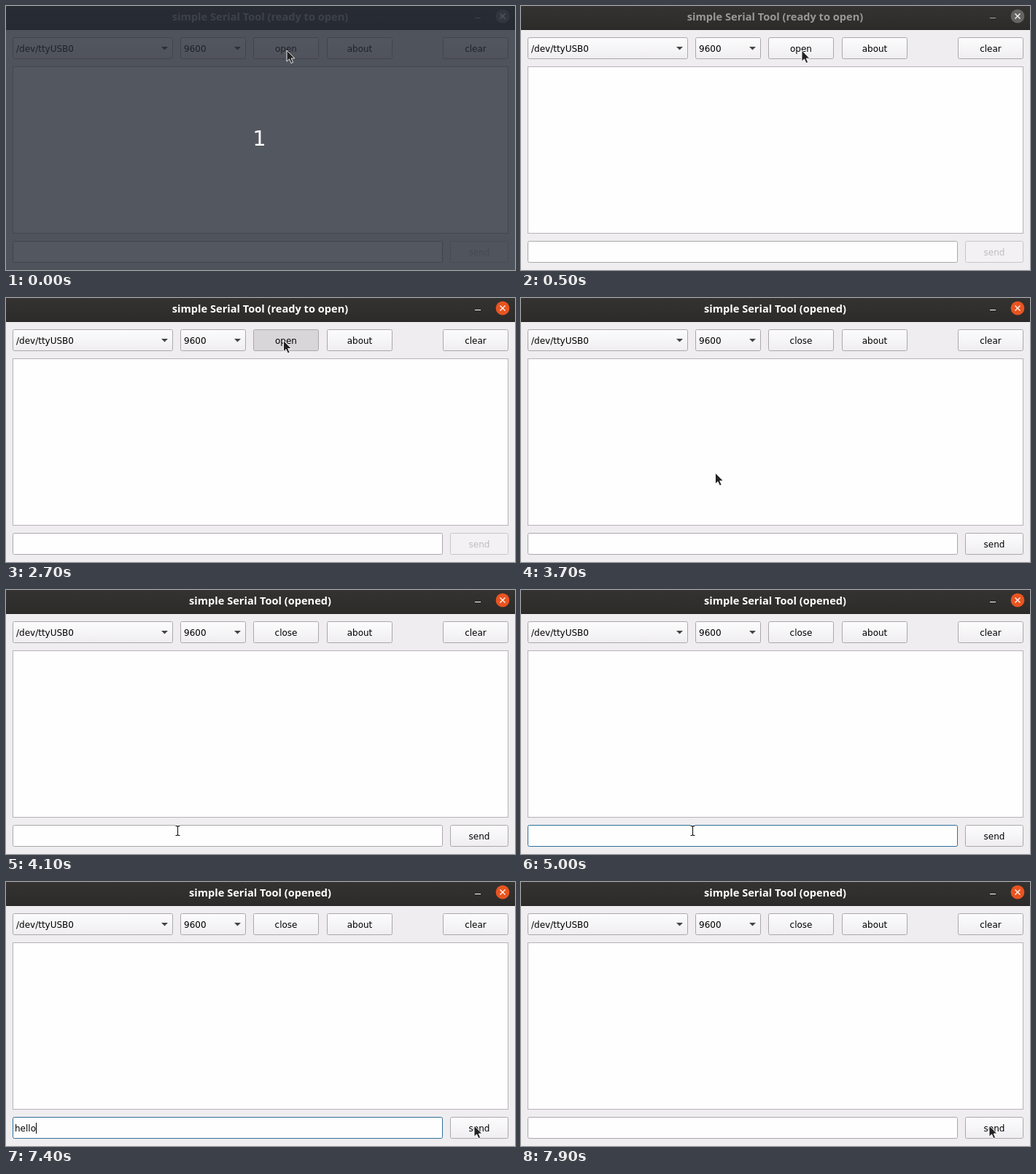
Write an HTML page that moves like this. It is 698 px wide and 363 px high and loops after 8000 ms.

```html
<!DOCTYPE html>
<html lang="en">
<head>
<meta charset="utf-8">
<title>Serial tool</title>
<style>
html, body { margin: 0; width: 100%; height: 100%; overflow: hidden; background: #efedef; }
svg { display: block; width: 698px; height: 363px; font: 12px "DejaVu Sans", sans-serif; }
text { white-space: pre; }
#title { font: bold 14.6px "Noto Sans", "Open Sans", sans-serif; }
#count { font-size: 29px; fill: #fff; }
.mid { text-anchor: middle; }
</style>
</head>
<body>
<svg viewBox="0 0 698 363">
  <defs>
    <linearGradient id="bar" x2="0" y2="1"><stop stop-color="#343331"/><stop offset="1" stop-color="#2c2b29"/></linearGradient>
    <linearGradient id="face" x2="0" y2="1"><stop stop-color="#fdfcfd"/><stop offset="1" stop-color="#efedf0"/></linearGradient>
  </defs>
  <rect width="698" height="363" fill="#efedef"/>
  <rect width="698" height="33" fill="url(#bar)"/>
  <rect y="32" width="698" height="1" fill="#242321"/>
  <text id="title" class="mid" x="348.5" y="20"></text>
  <rect id="min" x="643" y="16" width="8" height="1"/>
  <circle id="quit" cx="681" cy="14" r="9.4"/>
  <path d="M677.5 10.5l7 7m0-7l-7 7" stroke="#fff" stroke-width="1.3"/>
  <g id="controls"></g>
  <rect x="9.5" y="83.5" width="679" height="229" fill="#fefefe" stroke="#b6b4b6"/>
  <rect id="field" x="9.5" y="323.5" width="589" height="29" rx="2" fill="#fefefe"/>
  <text id="typed" x="12" y="343"></text>
  <rect id="caret" y="331" width="1" height="15"/>
  <g id="shade">
    <rect width="698" height="363" fill="rgb(38,43,53)" fill-opacity=".79"/>
    <text id="count" class="mid" x="347.6" y="192">1</text>
  </g>
  <path id="arrow" d="M0 0V15.2L3.5 12L6 17.6L8.6 16.5L6.2 11H10.8Z" fill="#222" stroke="#fff" stroke-width=".9"/>
  <g id="beam" fill="none">
    <path d="M-3 -7H3M0 -7V7M-3 7H3" stroke="#fff" stroke-width="2.6" stroke-opacity=".8"/>
    <path d="M-3 -6.5H-1L0 -5.5L1 -6.5H3M0 -5.5V5.5M-3 6.5H-1L0 5.5L1 6.5H3" stroke="#111" stroke-width="1.1"/>
  </g>
</svg>
<script>
const LOOP = 8000;
const $ = id => document.getElementById(id);
const set = (el, attrs) => { for (const k in attrs) el.setAttribute(k, attrs[k]); };
const show = (el, on) => set(el, { visibility: on ? "visible" : "hidden" });

function add(tag, attrs, text = "") {
  const el = document.createElementNS("http://www.w3.org/2000/svg", tag);
  set(el, attrs);
  el.textContent = text;
  $("controls").append(el);
  return el;
}

const box = (x, y, w) => add("rect", { x: x + .5, y: y + .5, width: w - 1, height: 29, rx: 2, fill: "url(#face)", stroke: "#aba8ab" });

function button(x, y, w, label) {
  const face = box(x, y, w);
  return { face, text: add("text", { class: "mid", x: x + w / 2, y: y + 20 }, label) };
}

function combo(x, w, label) {
  box(x, 43, w);
  add("text", { x: x + 5, y: 63 }, label);
  add("path", { d: `M${x + w - 16} 56h9l-4.5 4.6z`, fill: "#444" });
}

combo(9, 220, "/dev/ttyUSB0");
combo(239, 90, "9600");
const port = button(339, 43, 90, "open");
button(440, 43, 90, "about");
button(599, 43, 90, "clear");
const send = button(609, 323, 80, "send");

// Pointer stops: time, x, y
const pointer = [
  [0, 385, 61], [600, 380, 74], [700, 365, 104], [800, 357, 121],
  [1100, 370, 88], [1200, 383, 60], [1600, 382, 59], [1700, 380.5, 58.5],
  [3700, 266.5, 240.5], [3800, 226, 287], [3900, 227, 312], [4000, 232.5, 332],
  [4100, 235.5, 331], [6700, 302.5, 331], [6800, 460.5, 329], [6900, 594.5, 329],
  [7100, 646, 324], [7300, 644, 330], [7400, 642, 335]
];
const keyTimes = [5200, 5400, 5600, 5800, 5900];
const within = (t, a, b) => t >= a && t < b;

function draw(t) {
  const active = t >= 2700, opened = t >= 2900;
  const focused = within(t, 4400, 7700);

  $("title").textContent = `simple Serial Tool (${opened ? "opened" : "ready to open"})`;
  set($("title"), { fill: active ? "#fff" : "#999895" });
  set($("min"), { fill: active ? "#fff" : "#a5a3a0" });
  set($("quit"), { fill: active ? "#e95420" : "#656462" });

  port.text.textContent = opened ? "close" : "open";
  set(port.face, { fill: within(t, 2700, 2900) ? "#d8d6d9" : "url(#face)" });
  set(send.text, { fill: opened ? "#000" : "#bebcbe" });
  set(send.face, {
    fill: within(t, 7700, 7900) ? "#d8d6d9" : opened ? "url(#face)" : "#f3f1f3",
    stroke: opened ? "#aba8ab" : "#c8c5c8"
  });

  const typed = t < 7900 ? "hello".slice(0, keyTimes.filter(k => k <= t).length) : "";
  $("typed").textContent = typed;
  set($("field"), { stroke: focused ? "#2f6f96" : "#aba8ab" });
  set($("caret"), { x: 12 + Math.round(typed ? $("typed").getComputedTextLength() : 0) });
  show($("caret"), focused && !within(t, 5000, 5200) && !within(t, 6700, 7100));
  show($("shade"), t < 500);

  const [, x, y] = pointer.filter(p => p[0] <= t).pop();
  const overField = within(t, 4000, 7100);
  show($("arrow"), !overField);
  show($("beam"), overField);
  set($(overField ? "beam" : "arrow"), { transform: `translate(${x} ${y})` });
}

const start = performance.now();
function tick() {
  draw((performance.now() - start) % LOOP);
  requestAnimationFrame(tick);
}
tick();
</script>
</body>
</html>
```
